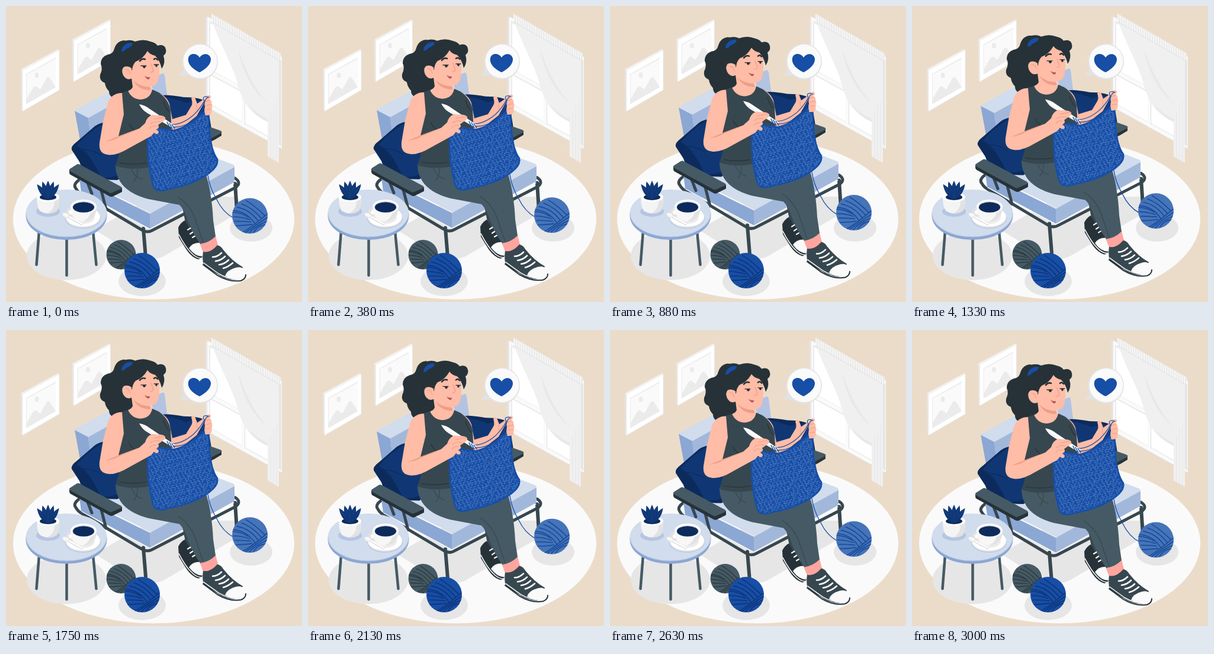
An HTML page with a canvas for the animation above (3.04 s loop, 500 by 500 pixels).

```html
<!DOCTYPE html>
<html lang="en">
<head>
<meta charset="utf-8">
<title>Knitting in an armchair</title>
<style>
html, body { margin: 0; width: 100%; height: 100%; overflow: hidden; background: #ebdcca; }
canvas { display: block; width: 500px; height: 500px; }
</style>
</head>
<body>
<canvas id="c"></canvas>
<script>
const LOOP = 3040, LIFT = 8.7;
const canvas = document.getElementById('c');
const ctx = canvas.getContext('2d');
const dpr = window.devicePixelRatio || 1;
canvas.width = canvas.height = 500 * dpr;

const SLATE = '#455a64', DARK = '#37474f', INK = '#263238';
const BLUE = '#174ea6', NAVY = '#103774', DEEP = '#0c2b5c';
const PALE = '#d1dced', MID = '#a2b8db', SIDE = '#8ba7d3';
const SKIN = '#ffbca6', SHADE = '#ee9e88', SHADOW = '#e6e6e6';

function fill(color, d) {
  ctx.fillStyle = color;
  ctx.fill(new Path2D(d));
}
function line(color, w, d) {
  ctx.strokeStyle = color;
  ctx.lineWidth = w;
  ctx.stroke(new Path2D(d));
}
function oval(color, x, y, rx, ry = rx, turn = 0) {
  ctx.fillStyle = color;
  ctx.beginPath();
  ctx.ellipse(x, y, rx, ry, turn, 0, Math.PI * 2);
  ctx.fill();
}
function group(draw, x = 0, y = 0) {
  ctx.save();
  ctx.translate(x, y);
  draw();
  ctx.restore();
}

function picture() {
  fill('#e6e6e6', 'M25 107L28 109V178L26 176Z');
  fill('#f2f2f2', 'M25 107L88 73L90 75L28 109Z');
  fill('#fff', 'M28 109L90 75V142L28 178Z');
  fill('#ebebeb', 'M34 115L84 87V137L34 166Z');
  fill('#fafafa', 'M35 116L84 89V137L35 165Z');
  fill('#ebebeb', 'M35 157L46 138Q50 133 54 138L58 141L68 123Q72 117 75 123L84 137L35 165Z');
  oval('#ebebeb', 52, 117, 3.5, 4.5);
  line('#e8e8e8', 1, 'M28 178L90 142V75');
}

function windowPane() {
  fill('#e6e6e6', 'M337 18L343 21V178L337 174Z');
  fill('#fafafa', 'M340 18L466 86V241L340 171Z');
  fill('#ebebeb', 'M343 25L460 88V231L343 165Z');
  fill('#fff', 'M345 29L398 58V136L345 107Z M345 116L398 145V195L345 165Z M404 62L460 92V170L404 139Z M404 148L460 179V229L404 198Z');
  fill('#fafafa', 'M343 107L460 170V177L343 114Z M398 56L403 58V200L398 197Z');
  line('#e0e0e0', 1, 'M343 115L460 178 M403.5 62V200 M340 172L465 241');
  // drapery
  fill('#e6e6e6', 'M461 88L465 91V238L461 234Z');
  fill('#f0f0f0', 'M349 28L461 88V265L442 254V195C417 186 401 165 393 138C385 103 367 77 349 28Z');
  fill('#e8e8e8', 'M392 72C400 117 420 148 446 167C426 149 408 119 392 72Z M442 191Q423 182 407 165Q422 187 442 196Z');
  line('#e6e6e6', 1, 'M447 178V256 M452 168V260 M457 160V262');
  fill('#f5f5f5', 'M347 13L464 80V93L347 27Z');
  ctx.strokeStyle = '#e2e2e2';
  ctx.lineWidth = 1;
  ctx.beginPath();
  for (let x = 350; x < 463; x += 4) {
    const y = 15 + (x - 350) * .57;
    ctx.moveTo(x, y);
    ctx.lineTo(x + .5, y + 13);
  }
  ctx.stroke();
  line('#e0e0e0', 1, 'M348 27L463 93');
}

function bubble() {
  fill('#e2e2e2', 'M300 104Q299 112 291 116Q301 120 311 116Z');
  oval('#e2e2e2', 327.5, 94, 30.5);
  oval('#fafafa', 328, 93.5, 28.5);
  fill(BLUE, 'M327 112C316 107 306 98 308 88C310 79 322 79 327 87C332 79 344 79 346 89C347 98 337 107 327 112Z');
}

function yarnBall(x, y, r, base, mark) {
  group(() => {
    ctx.scale(r / 30, r / 30);
    oval(base, 0, 0, 30);
    ctx.beginPath();
    ctx.arc(0, 0, 30, 0, Math.PI * 2);
    ctx.clip();
    ctx.lineCap = 'round';
    const w = 1.6;
    for (let i = 0; i < 4; i++) {
      const k = i * 7.5;
      line(mark, w, `M${-29 + k} ${-9 - k * .75}Q${-5 + k * .6} ${-8 - k * .4} ${9 + k * .7} ${14 - k * .65}`);
      line(mark, w, `M${-30 + k * .3} ${-6 + k}Q${-16 + k * .2} ${-6 + k} ${-3 + k * .3} ${2 + k * .55}`);
      line(mark, w, `M${-16 + k} ${30 - k * .1}Q${2 + k * .5} ${20 - k * .2} ${29} ${-3 + k * .8}`);
    }
  }, x, y);
}

function chairBack() {
  fill(PALE, 'M116 177L173 146L200 136L268 114L272 154L200 215L140 215Z');
  fill(SIDE, 'M116 177L139 189L143 222L125 226Z');
  fill(MID, 'M139 189L172 171L185 220L143 222Z');
  fill(PALE, 'M116 177Q118 174 172 146L188 160L139 189Z');
  fill('#b3c3e2', 'M242 124L264 114Q267 113 268 118L273 157L250 145Z');
  fill(DEEP, 'M258 152Q268 148 300 154Q330 154 340 163L347 208L300 220L262 190Z');
  fill(NAVY, 'M262 154Q282 155 304 164Q325 158 335 163L342 212L290 212Z');
}

function seat() {
  line(DARK, 6, 'M232 376L236 425 M387 300L390 346');
  line(DARK, 5, 'M131 289Q111 300 118 308Q121 314 128 318L229 378Q238 384 247 379L387 307Q399 299 387 291');
  fill(PALE, 'M126 291L264 222L384 268Q388 271 384 274L246 350Z');
  fill(SIDE, 'M124 292L243 351V376L127 314Z');
  fill(MID, 'M243 351L386 272V294Q386 297 383 299L243 376Z');
  line('#fafafa', 1.2, 'M128 315L243 377L385 300');
}

function pillow() {
  fill(DEEP, 'M111 243Q109 237 120 229L150 203Q163 194 178 197L200 220L206 284L188 294Q165 294 151 290Q129 281 124 263Z');
  fill(NAVY, 'M119 236Q139 213 161 201L195 207L207 277Q180 293 160 289Q145 254 119 236Z');
  line(DEEP, 1.3, 'M119 236Q144 248 156 289 M130 242Q149 244 161 252');
}

function armRight() {
  fill(INK, 'M340 219L364 213V219Q352 227 340 232Z');
  fill(SLATE, 'M341 204Q345 204 363 211Q366 213 363 215L340 227Z');
}

function armLeft() {
  line(DARK, 5, 'M135 291L145 317 M160 308L169 343');
  fill(INK, 'M107 276L178 315L196 307V314L180 322Q177 323 174 321L109 285Q107 284 107 281Z');
  fill(SLATE, 'M108 275L119 268Q122 266 125 268L194 305Q197 307 194 309L180 315Q177 317 174 315L108 279Q106 277 108 275Z');
}

function backShoe() {
  fill(DARK, 'M298 340L324 352L332 402L305 376Z');
  fill(INK, 'M291 374Q295 366 302 362L310 376L324 390Q333 400 334 415Q334 426 325 428Q314 425 305 412L292 391Z');
  fill('#fafafa', 'M309 409Q315 399 329 400Q335 412 333 423Q320 424 309 409Z');
  line('#fafafa', 1.6, 'M292 386Q303 407 312 416Q321 426 330 426');
  line('#fafafa', 2.2, 'M307 378L312 375 M311 385L317 381 M315 391L322 387');
}

function frontShoe() {
  fill('#ffa5a0', 'M326 398L354 388L359 408Q348 418 333 416Z');
  fill(DARK, 'M333 415Q345 418 357 404Q363 405 367 412Q382 431 400 441L392 462Q371 464 357 453L334 439Q331 427 333 415Z');
  fill('#fafafa', 'M370 456Q373 446 388 442Q398 439 404 447Q408 457 400 461Q386 465 370 456Z');
  line(INK, 2, 'M333 437L357 455Q377 467 397 464Q405 461 405 454');
  line('#fafafa', 1.5, 'M334 434L359 452Q377 463 396 461');
  line('#fafafa', 2.6, 'M349 424Q357 424 364 417 M354 431Q363 430 370 423 M360 437Q369 436 376 429 M367 443Q375 441 383 434');
}

function hairBack() {
  fill(INK, 'M200 58Q187 59 183 72Q181 81 172 82Q160 86 160 98Q164 106 159 116Q157 126 167 130Q168 138 174 144Q174 155 187 156Q202 153 207 143Q220 139 220 122L217 75Z');
}

function body() {
  // far arm
  fill(SKIN, 'M252 146Q270 149 276 165L281 191L304 184L313 169Q316 165 313 156Q315 152 319 154L323 165L333 158Q337 160 331 170L322 186L289 212L266 212Z');
  line(SHADE, 1, 'M322 166Q320 172 324 177');
  // neck and chest
  fill(SKIN, 'M211 114L214 137Q211 144 194 149L209 162H246L258 150Q247 147 244 136L240 122Z');
  fill(SHADE, 'M215 126Q225 136 243 137L244 142Q225 143 215 126Z');
  // top
  fill(DARK, 'M194 147L206 143Q212 157 227 158Q244 157 247 141L258 146Q275 158 278 176L280 214L264 268Q219 282 184 271Q196 244 190 219L196 185Z');
  line(INK, 1.2, 'M208 199Q212 208 222 213 M266 160Q269 171 275 178 M192 265Q216 269 237 265');
}

function head() {
  fill(SKIN, 'M208 98L221 79L244 70L258 83L259 109Q259 130 251 134Q241 138 224 131Q213 125 210 119Z');
  fill(INK, 'M188 91Q182 70 195 61Q208 55 218 60Q232 55 244 60Q253 62 256 67Q265 64 269 70Q273 79 266 84Q270 96 263 106Q260 92 252 84Q243 82 239 76Q231 90 219 94Q214 99 213 108L207 117L194 115Z');
  fill(SKIN, 'M212 105Q206 100 199 103Q194 108 198 117Q204 127 213 122Z');
  line(SHADE, 1.1, 'M202 107Q208 107 210 115');
  fill(BLUE, 'M195 77Q195 69 203 64Q209 61 214 63Q213 68 208 70Q202 72 200 76Z');
  line(INK, 2.6, 'M226 93Q230 88 235 90 M250 90Q253 87 256 91');
  line(INK, 1.3, 'M228 101L237 101 M250 99L258 99');
  fill(INK, 'M231 101H236Q236 105 233.5 105Q231 105 231 101Z M252 99H256Q256 103 254 103Q252 103 252 99Z');
  line(SHADE, 1.3, 'M245 98L249 109Q248 112 244 112');
  fill('#b95560', 'M234 118Q238 121 243 120Q243 124 240 124Q237 123 234 118Z');
}

function pants() {
  fill(SLATE, 'M185 270Q219 281 258 268L337 282Q343 300 346 322Q349 340 350 362L354 389Q343 400 328 402Q316 385 308 365Q302 345 293 336L240 326Q206 317 193 297Q185 284 185 270Z');
  line(DARK, 1.2, 'M212 276Q218 290 230 293 M222 275Q223 288 216 296 M291 323Q314 338 322 367L333 399');
}

const CLOTH = new Path2D('M239 211Q248 204 259 206L284 209Q318 200 343 167Q343 212 349 238Q353 252 358 258Q360 268 351 277Q326 301 276 310Q253 318 248 305Q235 263 239 211Z');

function cloth() {
  ctx.fillStyle = BLUE;
  ctx.fill(CLOTH);
  ctx.save();
  ctx.clip(CLOTH);
  ctx.strokeStyle = '#5580c4';
  ctx.lineWidth = 1;
  ctx.beginPath();
  let seed = 7;
  const rnd = () => (seed = seed * 16807 % 2147483647) / 2147483647;
  for (let row = 0; row < 23; row++) {
    for (let col = 0; col < 22; col++) {
      const x = 236 + col * 6 + (row % 2) * 3 + rnd();
      const y = 205 + row * 6 - col * 1.6 + rnd();
      const s = rnd() < .5 ? -1 : 1;
      ctx.moveTo(x - 2 * s, y - 2);
      ctx.quadraticCurveTo(x + 3 * s, y - 3, x + s, y);
      ctx.quadraticCurveTo(x - 2 * s, y + 2, x + 2.5 * s, y + 2);
    }
  }
  ctx.stroke();
  ctx.strokeStyle = BLUE;
  ctx.lineWidth = 5;
  ctx.stroke(CLOTH);
  ctx.restore();
}

function needleAndHands() {
  fill(SKIN, 'M334 159Q339 149 345 151Q348 154 343 158Q349 160 347 165Q350 169 347 174Q349 179 345 184L337 185Q334 177 336 170Z');
  line(SHADE, 1, 'M338 161L345 159 M338 168L347 166 M338 175L347 174');
  line(BLUE, 1.2, 'M275 203Q291 208 311 197Q330 184 334 169Q337 153 343 154 M277 200Q296 202 317 184Q330 171 335 160Q330 152 340 153');
  fill('#fff', 'M225 166Q234 167 243 174L285 202L281 206L239 181Q230 176 225 166Z');
  line('#d8dce4', .8, 'M229 171L281 205');
  line(BLUE, 1.4, 'M272 196L277 206 M276 198L281 207 M280 200L285 207');
}

function nearArm() {
  fill(SKIN, 'M196 147Q178 147 172 164L164 195L158 231Q156 249 171 251Q185 254 208 240L239 223Q249 219 252 209Q261 206 257 201L268 193Q272 187 262 185L247 184Q238 187 235 198L225 207L190 220L199 183Z');
  fill(SHADE, 'M190 220L168 229Q183 227 190 222L224 208L214 211Z');
  line(SHADE, 1.1, 'M250 191L266 188 M244 199Q250 194 260 196 M243 207Q247 201 254 203 M245 212Q248 210 251 210');
  fill(SKIN, 'M244 208Q248 205 252 207L258 212Q258 217 253 216L248 213L246 219L240 221Z');
}

function sitter() {
  chairBack();
  seat();
  armRight();
  pillow();
  backShoe();
  hairBack();
  body();
  head();
  frontShoe();
  pants();
  line(BLUE, 1.3, 'M341 286Q344 307 356 327Q366 348 384 358');
  cloth();
  needleAndHands();
  nearArm();
  armLeft();
  yarnBall(412, 354.5, 30, '#4674b9', '#174a99');
}

function shadows() {
  oval(SHADOW, 102, 422, 67, 41);
  fill(SHADOW, 'M150 378L246 323L388 322Q408 340 388 352L266 423Q245 432 222 423Z');
  oval(SHADOW, 414, 375, 36, 23);
  oval(SHADOW, 230, 465, 40, 25);
}

function plant() {
  oval('#b5c5e2', 71, 347, 20, 9);
  fill('#f4f4f4', 'M52 323H90Q90 339 86 346Q72 355 57 346Q52 339 52 323Z');
  fill('#e2e2e2', 'M82 330L90 323Q90 339 86 346Q79 351 70 350Q82 344 82 330Z');
  oval('#fff', 71, 323, 19, 8);
  oval(DEEP, 71, 323, 14, 5);
  for (const turn of [-.62, .62, -.3, .3, 0]) {
    group(() => {
      ctx.rotate(turn);
      fill(NAVY, 'M0 0Q-9 -14 0 -32Q9 -14 0 0Z');
      line(BLUE, .6, 'M0 -4V-28');
    }, 71, 327);
  }
}

function table() {
  line(SLATE, 4.5, 'M56 380L51.5 437 M102.5 390V455 M147 380L152.5 437');
  oval(SIDE, 102, 354.5, 68.5, 40.5);
  oval(PALE, 102, 350, 68.5, 40);
  line('#bac9e4', 1, 'M34 350A68 40 0 0 0 170 350');
  plant();
  // cup
  oval('#bac9e4', 130, 359, 30, 17);
  oval('#e2e2e2', 130, 358, 29, 16.5);
  oval('#fff', 130, 356, 29, 16.5);
  oval('#ececec', 130, 357, 20, 11);
  line('#e2e2e2', 4, 'M109 343Q101 343 105 352Q109 356 115 352');
  fill('#f7f7f7', 'M109 339L153 339Q153 355 142 362Q131 366 120 362Q109 355 109 339Z');
  fill('#e3e3e3', 'M143 346L153 339Q153 355 142 362Q136 364 130 364Q143 357 143 346Z');
  oval('#fff', 131, 339, 22, 12);
  oval('#dcdcdc', 131, 339.5, 19, 9.8);
  oval(DEEP, 131, 340, 18, 8.7);
  line('#dadada', 3, 'M104 356L128 369');
  line('#fff', 2, 'M104 355L128 368');
  oval('#e4e4e4', 101, 354, 6, 3.5, .45);
  oval('#f8f8f8', 101, 353, 5.5, 3, .45);
}

function draw(now) {
  const lift = LIFT * (1 - Math.cos(now % LOOP / LOOP * Math.PI * 2)) / 2;
  ctx.setTransform(dpr, 0, 0, dpr, 0, 0);
  ctx.lineCap = ctx.lineJoin = 'round';
  ctx.fillStyle = '#ebdcca';
  ctx.fillRect(0, 0, 500, 500);
  group(picture);
  group(picture, 86.5, -50);
  oval('#fafafa', 249.5, 360, 237.5, 135.5);
  windowPane();
  shadows();
  bubble();
  group(sitter, 0, -lift);
  table();
  yarnBall(194.5, 420, 25, SLATE, '#2b3a41');
  yarnBall(230, 447, 30, BLUE, '#0d3478');
}

let start;
function tick(now) {
  if (start === undefined) start = now;
  draw(now - start);
  requestAnimationFrame(tick);
}
draw(0);
requestAnimationFrame(tick);
</script>
</body>
</html>
```
